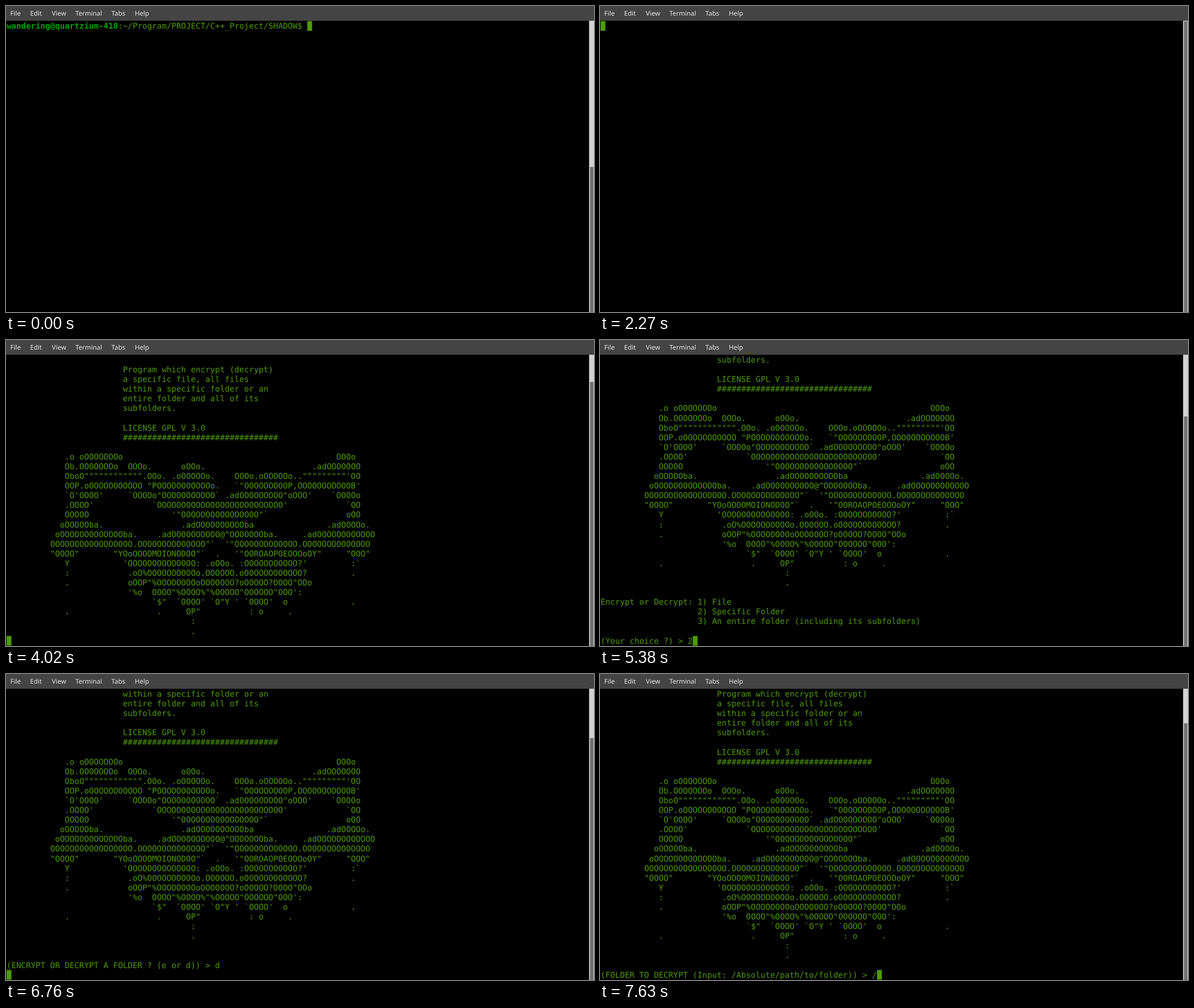
An HTML page for the animation above (8 s loop, 1036 px wide and 540 px high).

```html
<!DOCTYPE html>
<html lang="en">
<head>
<meta charset="utf-8">
<title>Terminal session</title>
<style>
  html, body { margin: 0; width: 100%; height: 100%; overflow: hidden; background: #000; }
  svg { display: block; width: 1036px; height: 540px; }
  text { white-space: pre; text-rendering: geometricPrecision; }
  .menu { font: 11.5px "Noto Sans", sans-serif; fill: #e8e8e8; }
  .term { font: 14.195px "DejaVu Sans Mono", monospace; fill: #4e9a06; }
  .term .host { font-weight: bold; fill: #00a000; }
  .term .alert { fill: #9c0000; }
  .bar { shape-rendering: crispEdges; }
</style>
</head>
<body>
<svg viewBox="0 0 1036 540">
  <rect width="1036" height="540" fill="#000"/>
  <g class="term" id="term"></g>
  <rect id="cursor" width="8.55" height="17.09" fill="#4e9a06"/>
  <g class="bar">
    <rect x="1027" y="26" width="9" height="514" fill="#d2d2d2"/>
    <rect x="1027" y="26" width="1" height="514" fill="#8a8a8a"/>
    <rect id="thumb" x="1029" width="6" fill="#717171"/>
  </g>
  <rect width="1036" height="26" fill="#444"/>
  <g class="menu" id="menu"></g>
</svg>

<!-- Each line: column~text pairs -->
<script type="text/plain" id="banner">
24~Program which encrypt (decrypt)
24~a specific file, all files
24~within a specific folder or an
24~entire folder and all of its
24~subfolders.

24~LICENSE GPL V 3.0
24~################################

12~.o oOOOOOOOo~68~OOOo
12~Ob.OOOOOOOo~25~OOOo.~36~oOOo.~63~.adOOOOOOO
12~OboO"""""""""""".OOo.~34~.oOOOOOo.~47~OOOo.oOOOOOo.."""""""""'OO
12~OOP.oOOOOOOOOOOO~29~"POOOOOOOOOOOo.~47~`"OOOOOOOOOP,OOOOOOOOOOOB'
12~`O'OOOO'~25~`OOOOo"OOOOOOOOOOO`~45~.adOOOOOOOOO"oOOO'~67~`OOOOo
12~.OOOO'~30~`OOOOOOOOOOOOOOOOOOOOOOOOOO'~70~`OO
12~OOOOO~34~'"OOOOOOOOOOOOOOOO"`~70~oOO
11~oOOOOOba.~36~.adOOOOOOOOOOba~66~.adOOOOo.
10~oOOOOOOOOOOOOOba.~31~.adOOOOOOOOOO@^OOOOOOOba.~61~.adOOOOOOOOOOOO
9~OOOOOOOOOOOOOOOOO.OOOOOOOOOOOOOO"`~45~'"OOOOOOOOOOOOO.OOOOOOOOOOOOOO
9~"OOOO"~22~"YOoOOOOMOIONODOO"`~43~.~47~'"OOROAOPOEOOOoOY"~70~"OOO"
12~Y~24~'OOOOOOOOOOOOOO:~41~.oOOo.~48~:OOOOOOOOOOO?'~71~:`
12~:~25~.oO%OOOOOOOOOOo.OOOOOO.oOOOOOOOOOOOO?~71~.
12~.~25~oOOP"%OOOOOOOOoOOOOOOO?oOOOOO?OOOO"OOo
25~'%o~30~OOOO"%OOOO%"%OOOOO"OOOOOO"OOO':
30~`$"~35~`OOOO'~42~`O"Y~47~'~49~`OOOO'~57~o~71~.
12~.~31~.~37~OP"~50~:~52~o~58~.
38~:
38~.
</script>

<script>
const ROWS = 30, CELL_W = 8.545, CELL_H = 17.09, LEFT = 1, TOP = 26.7, BASE = 13.3;
const LOOP = 8000;
const $ = id => document.getElementById(id);

function addText(parent, x, y, text, cls) {
  const el = document.createElementNS("http://www.w3.org/2000/svg", "text");
  el.setAttribute("x", x);
  el.setAttribute("y", y);
  if (cls) el.setAttribute("class", cls);
  el.textContent = text;
  parent.appendChild(el);
}

function setAttrs(el, attrs) {
  for (const name in attrs) el.setAttribute(name, attrs[name]);
}

const seg = (line, col, text, cls) => ({ line, col, text, cls });

// The banner starts on line 4 of the scrollback.
const banner = $("banner").textContent.trim().split("\n").flatMap((row, i) => {
  const parts = row.split("~"), out = [];
  for (let k = 0; k + 1 < parts.length; k += 2) out.push(seg(i + 4, +parts[k], parts[k + 1]));
  return out;
});

// total: lines in the scrollback; the last ROWS of them are visible.
const screen = (total, segs, line, col) => ({ total, segs, line, col });
const blank = screen(ROWS, [], 0, 0);

const HOST = "wandering@quartzium-418", PATH = ":~/Program/PROJECT/C++_Project/SHADOW$ ";
function shell(typed, entered) {
  const rest = PATH + typed;
  return screen(60, [seg(30, 0, HOST, "host"), seg(30, HOST.length, rest)],
    entered ? 31 : 30, entered ? 0 : HOST.length + rest.length);
}

// Banner, extra lines and an input line; Enter moves the cursor one line down.
function ask(line, text, entered, extra = []) {
  const at = entered ? line + 1 : line;
  return screen(at + 1, [...banner, ...extra, seg(line, 0, text)], at, entered ? 0 : text.length);
}

const run = screen(35, [...banner, seg(33, 32, "[ PRESS ENTER TO RUN ]", "alert")], 34, 0);
const bare = screen(33, banner, 32, 0);
const choices = [
  seg(33, 0, "Encrypt or Decrypt: 1) File"),
  seg(34, 20, "2) Specific Folder"),
  seg(35, 20, "3) An entire folder (including its subfolders)")
];
const choose = entered => ask(37, "(Your choice ?) > 2", entered, choices);
const mode = entered => ask(34, "(ENCRYPT OR DECRYPT A FOLDER ? (e or d)) > d", entered);

const timeline = [
  [0, shell("")],
  [1350, shell(".")],
  [1580, shell("./")],
  [1660, shell("./S")],
  [1800, shell("./SHADOW ")],
  [2170, shell("./SHADOW ", true)],
  [2270, blank],
  [3820, run],
  [3920, blank],
  [4020, bare],
  [5380, choose(false)],
  [5600, choose(true)],
  [5700, blank],
  [6430, mode(false)],
  [6760, mode(true)],
  [6860, blank],
  [6960, bare],
  [7630, ask(33, "(FOLDER TO DECRYPT (Input: /Absolute/path/to/folder)) > /", false)]
];

const colX = col => LEFT + col * CELL_W;
const rowY = row => TOP + row * CELL_H;

let shown = null;
function draw(t) {
  const current = timeline.filter(([start]) => start <= t).pop()[1];
  if (current === shown) return;
  shown = current;
  const first = current.total - ROWS;
  $("term").textContent = "";
  for (const s of current.segs) {
    if (s.line >= first) addText($("term"), colX(s.col), rowY(s.line - first) + BASE, s.text, s.cls);
  }
  setAttrs($("cursor"), { x: colX(current.col), y: rowY(current.line - first) });
  const thumbY = 27 + 513 * first / current.total;
  setAttrs($("thumb"), { y: thumbY, height: 540 - thumbY });
}

[["File", 7.5], ["Edit", 42.6], ["View", 80.8], ["Terminal", 122.2], ["Tabs", 185.8], ["Help", 227]]
  .forEach(([label, x]) => addText($("menu"), x, 17, label));

const begin = performance.now();
function tick() {
  draw((performance.now() - begin) % LOOP);
  requestAnimationFrame(tick);
}
tick();
</script>
</body>
</html>
```
